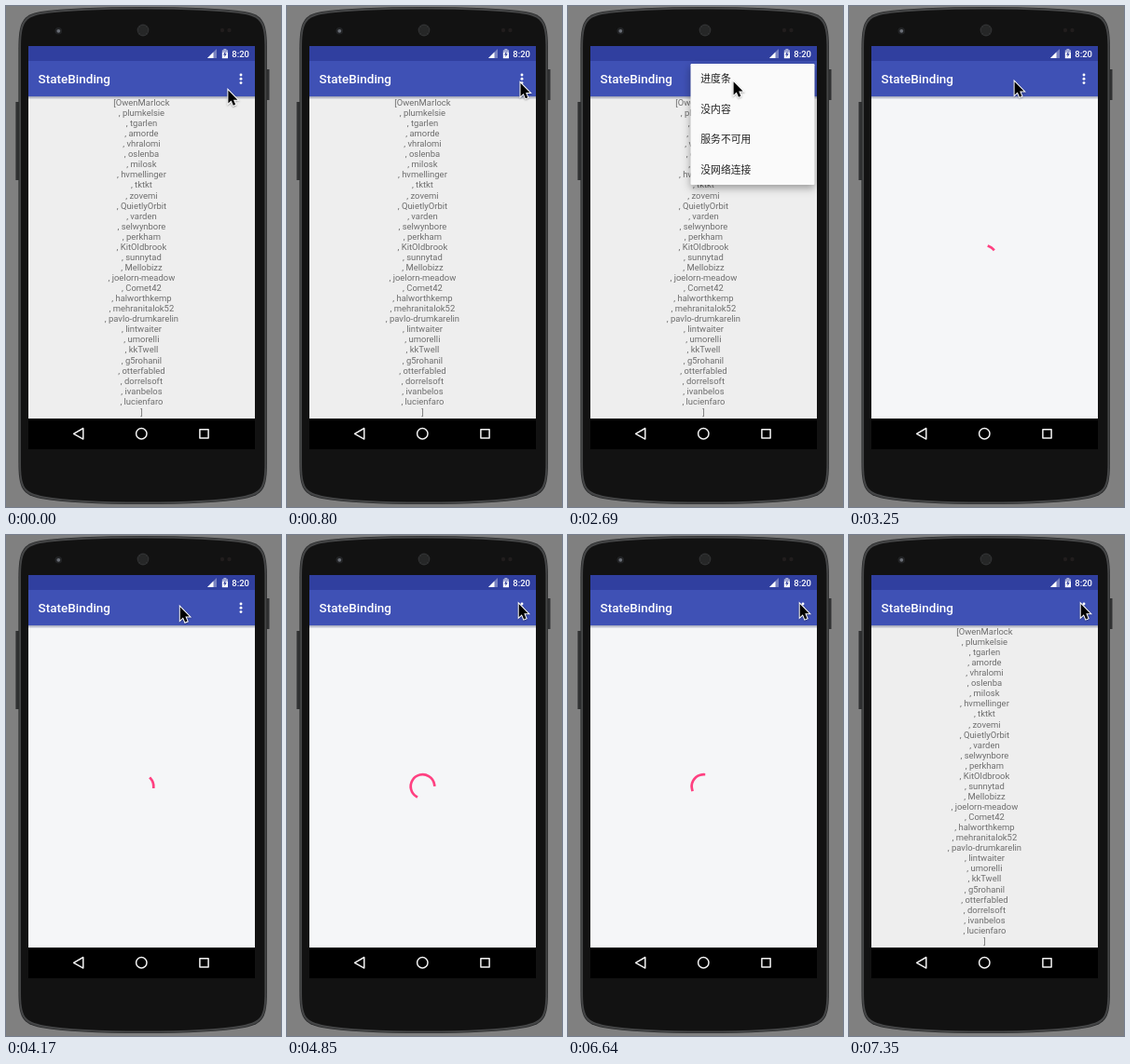
These frames come from a looping animation (295x538 px, 8 s). An HTML page with a canvas:

```html
<!DOCTYPE html>
<html lang="en">
<head>
<meta charset="utf-8">
<title>StateBinding</title>
<style>
html, body { margin: 0; width: 100%; height: 100%; overflow: hidden; background: #808080; }
canvas { display: block; width: 295px; height: 538px; }
</style>
</head>
<body>
<canvas id="stage"></canvas>
<script>
const W = 295, H = 538, LOOP = 8000;
const MENU_IN = 2000, LOAD_IN = 3130, LOAD_OUT = 7350;
const TAU = Math.PI * 2;
const LEFT = 24, WIDTH = 243;

const canvas = document.getElementById('stage');
const ctx = canvas.getContext('2d');
const dpr = window.devicePixelRatio || 1;
canvas.width = W * dpr;
canvas.height = H * dpr;

const names = ['OwenMarlock', 'plumkelsie', 'tgarlen', 'amorde', 'vhralomi', 'oslenba',
  'milosk', 'hvmellinger', 'tktkt', 'zovemi', 'QuietlyOrbit', 'varden', 'selwynbore',
  'perkham', 'KitOldbrook', 'sunnytad', 'Mellobizz', 'joelorn-meadow', 'Comet42',
  'halworthkemp', 'mehranitalok52', 'pavlo-drumkarelin', 'lintwaiter', 'umorelli',
  'kkTwell', 'g5rohanil', 'otterfabled', 'dorrelsoft', 'ivanbelos', 'lucienfaro'];
const lines = names.map((n, i) => (i ? ', ' : '[') + n).concat(']');
const menuItems = ['进度条', '没内容', '服务不可用', '没网络连接'];

// Pointer moves: start, end, x, y, bow
const moves = [
  [250, 560, 250.5, 87, 0],
  [690, 800, 250.5, 82.8, 0],
  [1790, 1790, 252, 82.8, 0],
  [2190, 2690, 177.6, 81.3, 13],
  [3990, 4790, 248.7, 74, -8]
];

const beats = [0, 300, 560, 740, 800, 1790, 2000, 2240, 2690, 3130, 3990, 4790, 4850, 5700, 6520, 7350];
function snap(t) {
  const start = beats.filter(b => b <= t).pop();
  return start + Math.floor((t - start) / 60) * 60;
}

function rect(x, y, w, h, fill) {
  ctx.fillStyle = fill;
  ctx.fillRect(x, y, w, h);
}

function disc(x, y, r, fill) {
  ctx.fillStyle = fill;
  ctx.beginPath();
  ctx.arc(x, y, r, 0, TAU);
  ctx.fill();
}

function poly(points) {
  ctx.beginPath();
  points.forEach(([x, y]) => ctx.lineTo(x, y));
  ctx.closePath();
}

function fillPoly(points, fill) {
  ctx.fillStyle = fill;
  poly(points);
  ctx.fill();
}

function text(str, x, y, font, fill, align = 'left') {
  ctx.font = font;
  ctx.fillStyle = fill;
  ctx.textAlign = align;
  ctx.fillText(str, x, y);
}

// Phone outline, shrunk by d on every side
function body(d, fill) {
  const l = 13.4 + d, r = 280 - d, t = 1 + d, b = 535 - d, m = 147;
  ctx.fillStyle = fill;
  ctx.beginPath();
  ctx.moveTo(l, 46);
  ctx.bezierCurveTo(l, 18, l + 4, t + 8, l + 24, t + 5);
  ctx.quadraticCurveTo(l + 60, t, m, t);
  ctx.quadraticCurveTo(r - 60, t, r - 24, t + 5);
  ctx.bezierCurveTo(r - 4, t + 8, r, 18, r, 46);
  ctx.lineTo(r, 490);
  ctx.bezierCurveTo(r, 518, r - 4, b - 10, r - 24, b - 6);
  ctx.quadraticCurveTo(r - 60, b, m, b);
  ctx.quadraticCurveTo(l + 60, b, l + 24, b - 6);
  ctx.bezierCurveTo(l + 4, b - 10, l, 518, l, 490);
  ctx.closePath();
  ctx.fill();
}

function drawPhone() {
  rect(0, 0, W, H, '#808080');
  rect(10.4, 103, 4, 84, '#303132');
  rect(279, 68, 3.5, 33, '#303132');
  body(0, '#2c2d2e');
  body(0.8, '#454647');
  body(2.6, '#121212');

  disc(56.3, 26.8, 3.8, '#222325');
  disc(56.3, 26.8, 1.9, '#6a6e76');
  disc(147, 26, 6.4, '#303132');
  for (let y = -4; y <= 4; y += 2)
    for (let x = -4; x <= 4; x += 2)
      if (x * x + y * y < 26) disc(147 + x, 26 + y, 0.65, '#161616');
  disc(232, 26, 2.2, '#211d1d');
  disc(239.5, 26, 2.2, '#211d1d');
}

function drawBars() {
  rect(LEFT, 43, WIDTH, 16, '#303f9f');
  rect(LEFT, 59, WIDTH, 38, '#3f51b5');
  const shade = ctx.createLinearGradient(0, 97, 0, 100.5);
  shade.addColorStop(0, 'rgba(30,40,90,.42)');
  shade.addColorStop(1, 'rgba(30,40,90,0)');
  rect(LEFT, 97, WIDTH, 3.5, shade);

  // signal, battery, clock
  fillPoly([[216, 56], [226, 56], [226, 46]], 'rgba(255,255,255,.35)');
  fillPoly([[216, 56], [222.5, 56], [222.5, 49.5]], '#fff');
  rect(233.4, 46, 3, 1.4, 'rgba(255,255,255,.6)');
  rect(231.8, 47.4, 6.2, 2.4, 'rgba(255,255,255,.6)');
  rect(231.8, 49.8, 6.2, 6.4, '#fff');
  fillPoly([[235.5, 48.5], [233, 52.4], [234.6, 52.4], [234.3, 55], [236.8, 51.3], [235.2, 51.3]], '#303f9f');
  text('8:20', 242.3, 55, '500 9.5px Roboto, sans-serif', '#fff');

  text('StateBinding', 34.6, 83, '500 13.5px Roboto, sans-serif', '#fff');
  [74, 78.3, 82.6].forEach(y => disc(252, y, 1.45, '#fff'));

  rect(LEFT, 443, WIDTH, 33, '#000');
  ctx.strokeStyle = '#f2f2f2';
  ctx.lineWidth = 1.5;
  ctx.lineJoin = 'round';
  poly([[72.6, 459.3], [82.8, 453.5], [82.8, 465.1]]);
  ctx.stroke();
  ctx.beginPath();
  ctx.arc(145.3, 459.3, 5.7, 0, TAU);
  ctx.stroke();
  ctx.strokeRect(207.9, 454.7, 9.2, 9.2);
}

function drawList() {
  lines.forEach((line, i) =>
    text(line, 145.4, 107 + i * 11.06, '9.45px Roboto, sans-serif', 'rgba(0,0,0,.54)', 'center'));
}

function drawMenu() {
  ctx.save();
  ctx.shadowColor = 'rgba(0,0,0,.36)';
  ctx.shadowBlur = 8 * dpr;
  ctx.shadowOffsetY = 3.5 * dpr;
  ctx.beginPath();
  ctx.roundRect(131.5, 62, 133, 130, 1.2);
  ctx.fillStyle = '#fafafa';
  ctx.fill();
  ctx.restore();
  menuItems.forEach((item, i) =>
    text(item, 142.3, 82.2 + i * 32.6, '10.8px "Noto Sans CJK SC", "Noto Sans CJK", sans-serif', 'rgba(0,0,0,.87)'));
}

// Material trim easing: bezier over the first half, then full
function trim(u) {
  if (u <= 0) return 0;
  if (u >= 0.5) return 1;
  let lo = 0, hi = 1;
  for (let i = 0; i < 24; i++) {
    const s = (lo + hi) / 2, q = 1 - s;
    const x = 0.6 * q * q * s + 0.3 * q * s * s + 0.5 * s * s * s;
    if (x < u) lo = s; else hi = s;
  }
  return lo * lo * (3 - 2 * lo);
}

function drawSpinner(t) {
  const age = Math.max(0, t - 3133 + Math.max(0, t - 4850) * 0.049);
  const u = age / 1333 % 1;
  const base = age / 6665 * 2 + u * 0.25 - 0.25;
  const from = base + 0.75 * trim(u - 0.5);
  const to = base + 0.75 * trim(u) + 0.002;
  ctx.strokeStyle = '#ff4081';
  ctx.lineWidth = 2.7;
  ctx.lineCap = 'square';
  ctx.beginPath();
  ctx.arc(145.5, 270, 12.8, from * TAU, to * TAU);
  ctx.stroke();
  ctx.lineCap = 'butt';
}

function pointerAt(t) {
  let x = 238.4, y = 90.4;
  for (const [start, end, x2, y2, bow] of moves) {
    if (t < start) break;
    const p = end > start ? Math.min(1, (t - start) / (end - start)) : 1;
    const e = p * p * (3 - 2 * p);
    x += (x2 - x) * e;
    y += (y2 - y) * e + bow * Math.sin(Math.PI * e);
  }
  return [x, y];
}

function drawPointer(t) {
  ctx.save();
  ctx.translate(...pointerAt(t));
  ctx.shadowColor = 'rgba(0,0,0,.35)';
  ctx.shadowBlur = 2 * dpr;
  ctx.shadowOffsetY = 0.8 * dpr;
  poly([[0, 0], [0, 14.2], [3.2, 11.2], [5.4, 16.4], [7.8, 15.4], [5.6, 10.3], [10, 10.3]]);
  ctx.strokeStyle = '#fff';
  ctx.lineWidth = 2;
  ctx.lineJoin = 'miter';
  ctx.stroke();
  ctx.shadowColor = 'transparent';
  ctx.fillStyle = '#000';
  ctx.fill();
  ctx.restore();
}

function draw(t) {
  const loading = t >= LOAD_IN && t < LOAD_OUT;
  ctx.setTransform(dpr, 0, 0, dpr, 0, 0);
  drawPhone();
  rect(LEFT, 97, WIDTH, 346, loading ? '#f5f6f8' : '#eeeeee');
  if (loading) drawSpinner(t); else drawList();
  drawBars();
  if (t >= MENU_IN && t < LOAD_IN) drawMenu();
  drawPointer(t);
}

const begin = performance.now();
function tick() {
  draw(snap((performance.now() - begin) % LOOP));
  requestAnimationFrame(tick);
}
tick();
</script>
</body>
</html>
```
